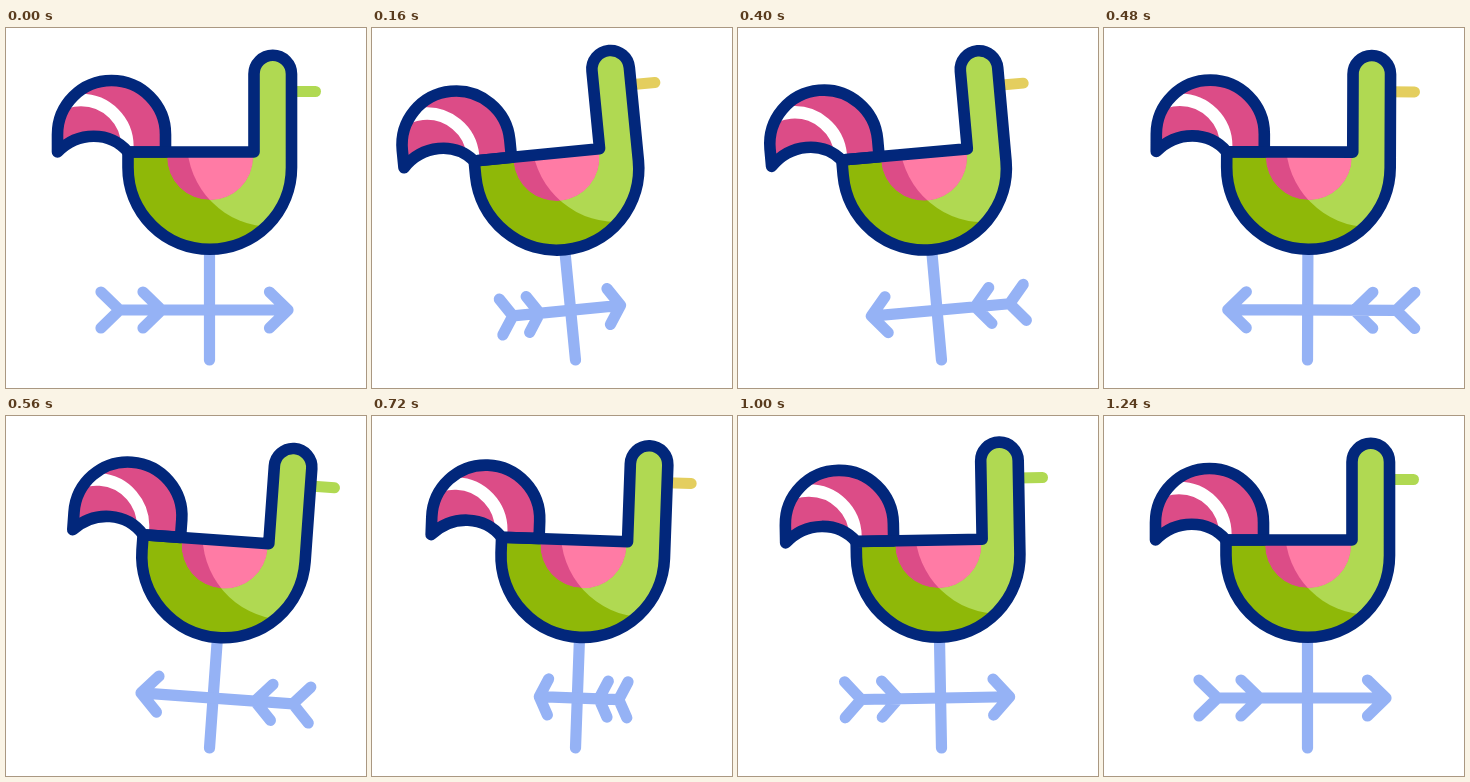
Animation, 360 px wide and 360 px high, one loop 2 s. Source, as an HTML page:

```html
<!DOCTYPE html>
<html lang="en">
<head>
<meta charset="utf-8">
<title>Weather vane</title>
<style>
  html, body { margin: 0; width: 100%; height: 100%; overflow: hidden; background: #fff; }
  svg { display: block; width: 100vw; height: 100vh; }
  path, line { stroke-linecap: round; stroke-linejoin: round; }
  .navy { fill: none; stroke: #02277b; stroke-width: 11.6; }
  .blue { fill: none; stroke: #95b2f5; stroke-width: 11.2; }
</style>
</head>
<body>
<svg viewBox="0 0 360 360">
  <defs>
    <path id="body" d="M122 124H248V46A18.75 18.75 0 0 1 285.5 46V139.5A81.75 81.75 0 0 1 122 139.5Z"/>
    <path id="tail" d="M159.5 124V106.5A54 54 0 0 0 51.5 106.5V124C72 103 104 103 122 124Z"/>
    <path id="wing" d="M161 124V129A43 43 0 0 0 247 129V124Z"/>
    <clipPath id="inBody"><use href="#body"/></clipPath>
    <clipPath id="inTail"><use href="#tail"/></clipPath>
    <clipPath id="inWing"><use href="#wing"/></clipPath>
  </defs>
  <g id="vane">
    <path class="blue" d="M203.5 222V332"/>
    <path class="blue" id="arrow"/>
    <line id="beak" x1="285" y1="63.5" x2="309.5" y2="63.5" stroke-width="11"/>
    <g clip-path="url(#inTail)">
      <use href="#tail" fill="#dc4c87"/>
      <circle cx="75" cy="118.5" r="46.4" fill="none" stroke="#fff" stroke-width="12.5"/>
    </g>
    <g clip-path="url(#inBody)">
      <use href="#body" fill="#8fb808"/>
      <circle cx="266" cy="114" r="85" fill="#b0d952"/>
      <g clip-path="url(#inWing)">
        <use href="#wing" fill="#dc4c87"/>
        <circle cx="266" cy="114" r="85" fill="#ff7ba5"/>
      </g>
    </g>
    <use class="navy" href="#tail"/>
    <use class="navy" href="#body"/>
  </g>
</svg>
<script>
const LOOP = 2000, POLE = 203.5, FOOT = 332;
const AXIS = 202.8, ARROW_Y = 282;

// [time in ms, value]
const sway = track([[0, 0], [160, -5.55], [290, -8.8], [400, -5.15], [560, 4.1], [600, 4.3],
  [720, 2.1], [900, -2.4], [1000, -1.07], [1120, -0.2], [1240, 0]]);
const turn = track([[0, 1], [160, 0.645], [400, -0.82], [480, -1], [560, -0.905],
  [720, -0.475], [1000, 0.88], [1240, 1]]);

// Monotone cubic curve through the keys, flat at every turning point.
function track(keys) {
  const rate = i => (keys[i + 1][1] - keys[i][1]) / (keys[i + 1][0] - keys[i][0]);
  const slope = keys.map((k, i) => {
    if (i === 0 || i === keys.length - 1) return 0;
    const a = rate(i - 1), b = rate(i);
    return a * b <= 0 ? 0 : 2 * a * b / (a + b);
  });
  return t => {
    const n = keys.findIndex(k => k[0] > t);
    if (n < 0) return keys[keys.length - 1][1];
    const [t0, v0] = keys[n - 1], [t1, v1] = keys[n];
    const h = t1 - t0, u = (t - t0) / h, w = 1 - u;
    return v0 * w * w * (1 + 2 * u) + v1 * u * u * (3 - 2 * u)
      + h * u * w * (slope[n - 1] * w - slope[n] * u);
  };
}

// The arrow narrows as it turns while its line keeps its weight.
function arrowPath(s) {
  const x = px => (AXIS + (px - AXIS) * s).toFixed(2);
  const chevron = px => `M${x(px - 18.5)} ${ARROW_Y - 18}L${x(px)} ${ARROW_Y}L${x(px - 18.5)} ${ARROW_Y + 18}`;
  return `M${x(113.5)} ${ARROW_Y}H${x(282)}` + [113.5, 155.5, 282].map(chevron).join("");
}

const vane = document.getElementById("vane");
const arrow = document.getElementById("arrow");
const beak = document.getElementById("beak");

function draw(t) {
  const golden = (t >= 40 && t < 520) || (t >= 640 && t < 960);
  vane.setAttribute("transform", `rotate(${sway(t).toFixed(3)} ${POLE} ${FOOT})`);
  arrow.setAttribute("d", arrowPath(turn(t)));
  beak.setAttribute("stroke", golden ? "#e4ce5e" : "#b0d952");
}

const start = performance.now();
function tick() {
  draw((performance.now() - start) % LOOP);
  requestAnimationFrame(tick);
}
tick();
</script>
</body>
</html>
```
